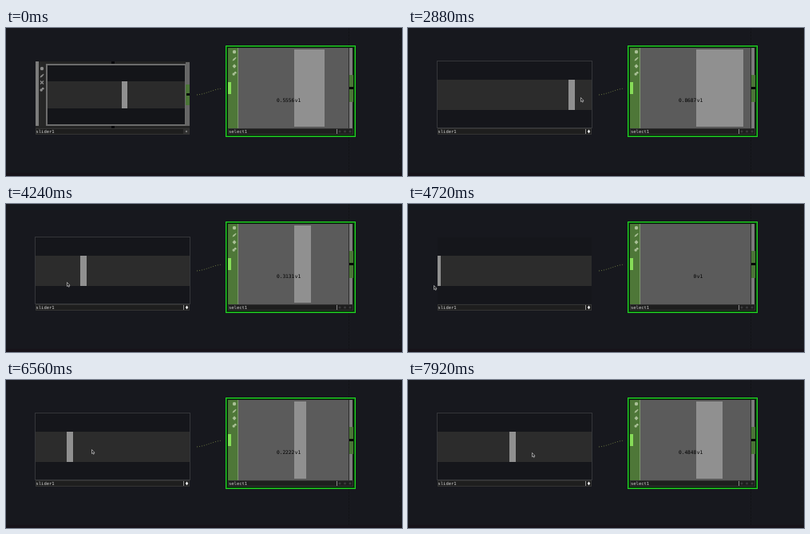
An HTML page for the animation above (8 s loop, 496 px wide and 186 px high).

```html
<!DOCTYPE html>
<html lang="en">
<head>
<meta charset="utf-8">
<title>Slider and select nodes</title>
<style>
html, body { margin: 0; width: 100%; height: 100%; overflow: hidden; background: #17181e; }
svg { display: block; width: 496px; height: 186px; }
rect { shape-rendering: crispEdges; }
.label { font: 5.5px "DejaVu Sans Mono", monospace; fill: #d2d2d2; }
.value { font: 6.2px "DejaVu Sans Mono", monospace; fill: #000; }
.line { fill: none; stroke-width: 1; }
</style>
</head>
<body>
<svg viewBox="0 0 496 186">
  <defs>
    <g id="flags">
      <circle r="2.2"/>
      <path d="M-2.5 11.5 L-1.5 9 L2 6.5 L2.5 7.5 L0 10.5Z"/>
    </g>
    <g id="clone">
      <circle cx="-.8" cy="1" r="1.7"/>
      <circle cx="1.2" cy="-.8" r="1.4"/>
    </g>
    <clipPath id="track"><rect x="37" y="65" width="193" height="38"/></clipPath>
  </defs>

  <rect width="496" height="186" fill="#17181e"/>
  <path d="M429.5 0V182" class="line" stroke="#111217" stroke-dasharray="3 1"/>
  <path d="M493.5 2V182" class="line" stroke="#1e1f22" stroke-dasharray="1 5"/>
  <rect y="182" width="496" height="4" fill="#17131a"/>
  <path d="M239 84 C251 83 259 77 271 76" class="line" stroke="#69743f" stroke-dasharray="1 2"/>

  <!-- slider, idle -->
  <g id="idle">
    <rect x="37" y="42" width="193" height="92" fill="#242424"/>
    <rect x="37" y="42" width="4" height="81" fill="#7c7c7c"/>
    <rect x="41" y="43" width="9" height="80" fill="#262626"/>
    <g fill="#8c8c8c">
      <use href="#flags" x="45" y="51"/>
      <path d="M43 66.5l4 4m0-4l-4 4" stroke="#8c8c8c" stroke-width="1.2"/>
      <use href="#clone" x="45" y="77"/>
    </g>
    <rect x="50" y="45" width="175" height="78" fill="#6c6c6c"/>
    <rect x="52" y="47" width="172" height="74" fill="#141519"/>
    <rect x="52" y="67" width="172" height="34" fill="#2b2b2b"/>
    <rect x="145" y="67" width="7" height="34" fill="#909090"/>
    <rect x="225" y="43" width="5" height="80" fill="#666"/>
    <rect x="225" y="71" width="5" height="26" fill="#4b7537"/>
    <rect x="226" y="82" width="4" height="3" fill="#0b0d0b"/>
    <rect x="132" y="42" width="4" height="3" fill="#08080a"/>
    <rect x="132" y="123" width="4" height="3" fill="#08080a"/>
    <rect x="37.5" y="126.5" width="192" height="7" fill="#1e1e1e" stroke="#343434"/>
    <rect x="222" y="127" width="7" height="6" fill="#303030"/>
    <circle cx="226" cy="130" r="1.2" fill="#777"/>
  </g>

  <!-- slider, active -->
  <g id="active">
    <rect x="37" y="42" width="193" height="83" fill="#15161b"/>
    <rect x="37" y="65" width="193" height="38" fill="#2c2c2c"/>
    <rect id="knob" y="65" width="8" height="38" fill="#909090" clip-path="url(#track)"/>
    <rect id="outline" x="36.5" y="41.5" width="194" height="84" class="line" stroke="#35363a"/>
    <rect x="37.5" y="126.5" width="192" height="7" fill="#1e1e1e" stroke="#343434"/>
    <rect x="222" y="127" width="1" height="6" fill="#8a8a8a"/>
    <path d="M226.5 127.6l1.7 2.4-1.7 2.4-1.7-2.4z" fill="#f0f0f0"/>
  </g>
  <text class="label" x="37.5" y="131.8">slider1</text>

  <!-- select -->
  <rect x="275" y="22" width="163" height="115" fill="#0a1a0b"/>
  <rect x="276.5" y="23.5" width="160" height="112" class="line" stroke="#0c6a10"/>
  <rect x="275.5" y="22.5" width="162" height="114" class="line" stroke="#22d424"/>
  <rect x="278" y="25" width="157" height="109" fill="#1c1d1c"/>
  <rect x="278" y="25" width="13" height="101" fill="#4e7738"/>
  <rect x="278" y="68" width="4" height="15" fill="#86dc58"/>
  <g fill="#a9c096">
    <use href="#flags" x="286" y="30"/>
    <path d="M286 45.2l2.5 2.8-2.5 2.8-2.5-2.8z"/>
    <use href="#clone" x="286" y="57"/>
  </g>
  <rect x="291" y="25" width="139" height="101" fill="#5b5b5b"/>
  <rect x="290" y="25" width="1" height="101" fill="#7c9a6c"/>
  <rect id="bar" x="361" y="27" height="97" fill="#909090"/>
  <rect x="429" y="25" width="1" height="101" fill="#2b2b2b"/>
  <rect x="430" y="25" width="4" height="101" fill="#7c7c7c"/>
  <rect x="430" y="59" width="5" height="34" fill="#4b7537"/>
  <rect x="430" y="74" width="5" height="3" fill="#050605"/>
  <rect x="278.5" y="126.5" width="156" height="7" fill="#1e1e1e" stroke="#343434"/>
  <text class="label" x="279" y="131.8">select1</text>
  <rect x="414" y="127" width="1" height="6" fill="#8a8a8a"/>
  <g fill="#3a3a3c">
    <circle cx="418" cy="130" r="1.5"/>
    <circle cx="424.5" cy="130" r="1.5"/>
    <circle cx="431" cy="130" r="1.5"/>
  </g>
  <text id="value" class="value" x="361.3" y="93" text-anchor="end"></text>
  <text class="value" x="361.8" y="93">v1</text>

  <path id="cursor" d="M.5 .5V5.5L1.7 4.6 2.5 6.3 3.3 6 2.6 4.3H4Z" fill="#0c0c0e" stroke="#e8e8e8" stroke-width=".6"/>
</svg>
<script>
const LOOP = 8000, STEP = 80, LAG = 80;
const SHOWN = 400, ACTIVATE = 1200, GRAB = 2240;

// Turning points of the pointer: time, x, y
const path = [
  [480, 219, 119], [960, 226, 128],
  [1520, 226, 128], [1840, 177, 70], [GRAB, 144.56, 85],
  [3130, 232, 88], [3520, 232, 85],
  [4565, 32, 102], [4720, 32, 102], [4800, 31, 127], [5040, 31, 127],
  [5800, 202, 90], [5840, 202, 90],
  [6480, 79.7, 86], [6720, 190, 88],
  [7560, 15, 126], [7600, 15, 126], [7930, 155, 91]
];

const clamp = (v, lo, hi) => Math.min(hi, Math.max(lo, v));
const ease = p => (1 - Math.cos(Math.PI * p)) / 2;

function pointerAt(t) {
  const i = clamp(path.findIndex(k => k[0] >= t), 1, path.length - 1);
  const [t0, x0, y0] = path[i - 1], [t1, x1, y1] = path[i];
  const p = ease(clamp((t - t0) / (t1 - t0), 0, 1));
  return [x0 + (x1 - x0) * p, y0 + (y1 - y0) * p];
}

// The knob trails the pointer and snaps to 99 divisions.
function valueAt(t) {
  const [x] = pointerAt(Math.max(t - LAG, GRAB));
  return Math.round(clamp((x - 36.5) / 194.5, 0, 1) * 99) / 99;
}

const [idle, active, knob, outline, bar, value, cursor] =
  ["idle", "active", "knob", "outline", "bar", "value", "cursor"]
    .map(id => document.getElementById(id));
const show = (el, on) => el.setAttribute("visibility", on ? "visible" : "hidden");

function draw(now) {
  const t = Math.floor(now % LOOP / STEP) * STEP;
  const [x, y] = pointerAt(t).map(Math.round);
  const v = valueAt(t);
  const on = t >= ACTIVATE;
  show(idle, !on);
  show(active, on);
  show(outline, on && x >= 36 && x <= 231);
  show(cursor, t >= SHOWN);
  cursor.setAttribute("transform", `translate(${x} ${y})`);
  knob.setAttribute("x", Math.round(32.5 + v * 194.5));
  bar.setAttribute("width", Math.round(v * 68));
  value.textContent = +v.toFixed(4);
}

const start = performance.now();
function tick() {
  draw(performance.now() - start);
  requestAnimationFrame(tick);
}
tick();
</script>
</body>
</html>
```
